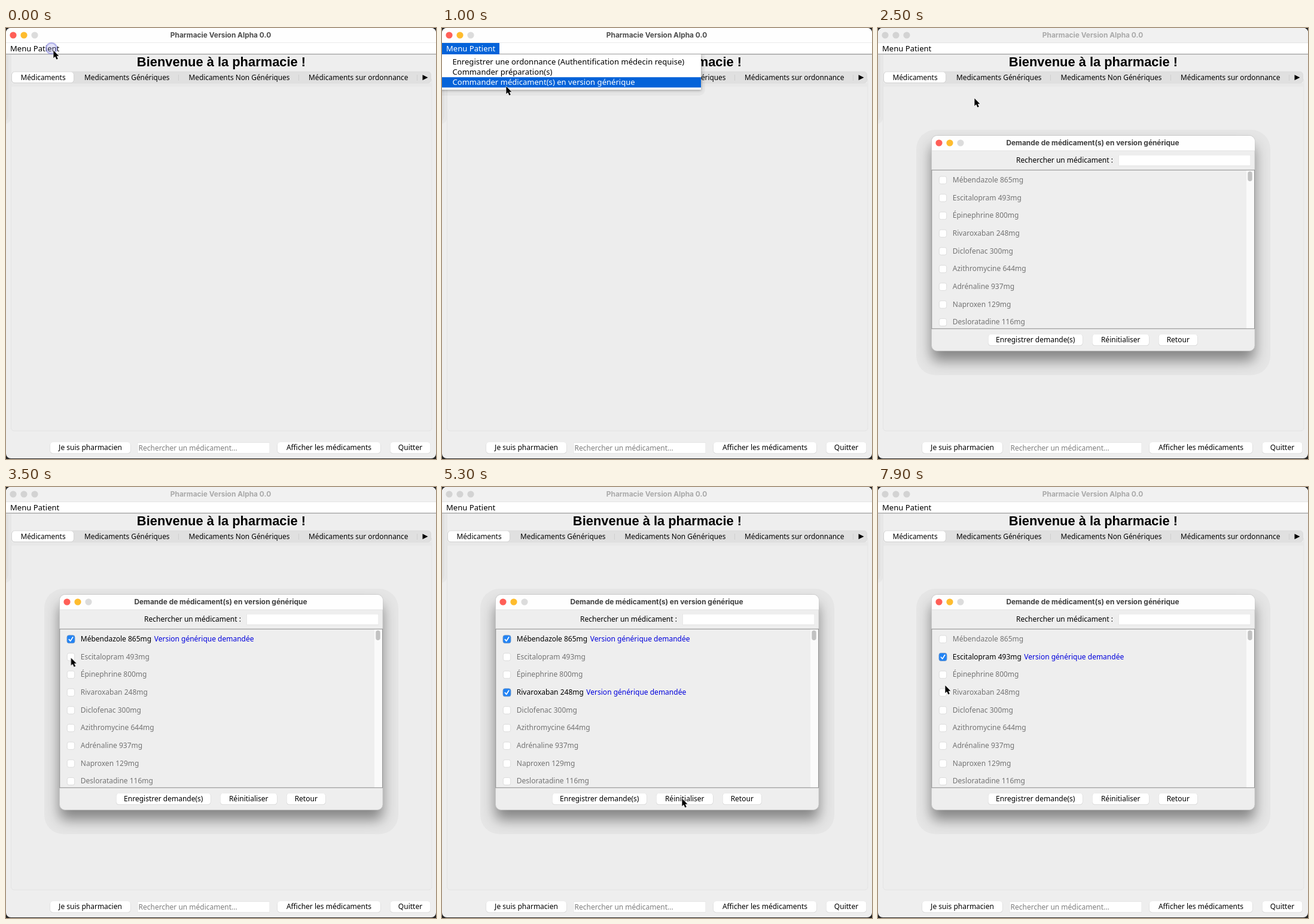
An HTML page for the animation above (8 s loop, 719 by 720 pixels).

```html
<!DOCTYPE html>
<html lang="fr">
<head>
<meta charset="utf-8">
<title>Pharmacie</title>
<style>
html, body { margin: 0; width: 100%; height: 100%; overflow: hidden; background: #222; }
svg { display: block; width: 100%; height: 100%; font: 12px "Noto Sans", "Open Sans", sans-serif; }
text { white-space: pre; }
.mid { text-anchor: middle; }
.tab { font-size: 11.85px; }
.menu { font-size: 13px; letter-spacing: .04px; }
.title { font: 700 11.9px Inter, sans-serif; text-anchor: middle; }
.heading { font: 700 21.9px "Liberation Sans", Arial, sans-serif; text-anchor: middle; }
.soft { filter: blur(11px); }
.tight { filter: blur(2px); }

.anim { animation: 8s step-end infinite; }
.open { animation-name: open; }
.item1 { animation-name: item1; }
.item2 { animation-name: item2; }
.item3 { animation-name: item3; }
.dialog { animation-name: dialog; }
.pick0 { animation-name: pick0; }
.pick1 { animation-name: pick1; }
.pick3 { animation-name: pick3; }
.focus { animation-name: focus; }
.ring { animation-name: ring; }
.cursor { animation-name: cursor; }

@keyframes open { 0% { opacity: 0 } 1.25% { opacity: 1 } 27.5%, 100% { opacity: 0 } }
@keyframes item1 { 0% { opacity: 0 } 3.75% { opacity: 1 } 5%, 100% { opacity: 0 } }
@keyframes item2 { 0% { opacity: 0 } 5% { opacity: 1 } 6.25%, 100% { opacity: 0 } }
@keyframes item3 { 0% { opacity: 0 } 6.25%, 100% { opacity: 1 } }
@keyframes dialog { 0% { opacity: 0 } 28.75%, 100% { opacity: 1 } }
@keyframes pick0 { 0% { opacity: 0 } 41.25% { opacity: 1 } 73.75%, 100% { opacity: 0 } }
@keyframes pick3 { 0% { opacity: 0 } 47.5% { opacity: 1 } 73.75%, 100% { opacity: 0 } }
@keyframes pick1 { 0% { opacity: 0 } 97.5%, 100% { opacity: 1 } }
@keyframes focus { 0% { opacity: 0 } 73.75% { opacity: 1 } 96.25%, 100% { opacity: 0 } }
@keyframes ring {
  0% { opacity: 1; transform: translate(76px, 34px) }
  2.5% { opacity: 0 }
  26.25% { opacity: 1; transform: translate(111px, 94px) }
  28.75% { opacity: 0 }
  40% { opacity: 1; transform: translate(109px, 253px) }
  42.5% { opacity: 0 }
  46.25% { opacity: 1; transform: translate(107px, 343px) }
  48.75% { opacity: 0 }
  72.5% { opacity: 1; transform: translate(401px, 521px) }
  75% { opacity: 0 }
  96.25% { opacity: 1; transform: translate(107px, 279px) }
  98.75%, 100% { opacity: 0; transform: translate(107px, 279px) }
}
/* The pointer advances every 100 ms: one step per 1.25 %. */
@keyframes cursor {
  0% { transform: translate(79px, 37px); animation-timing-function: steps(2) }
  2.5% { transform: translate(80px, 39px) }
  3.75% { transform: translate(84px, 52px) }
  5% { transform: translate(91px, 70px) }
  6.25% { transform: translate(97px, 86px) }
  7.5% { transform: translate(101px, 97px); animation-timing-function: steps(3) }
  11.25% { transform: translate(106px, 98px); animation-timing-function: steps(3) }
  15% { transform: translate(109px, 95px) }
  25% { transform: translate(111px, 94px) }
  27.5% { transform: translate(113px, 95px) }
  28.75% { transform: translate(127px, 101px); animation-timing-function: steps(2) }
  31.25% { transform: translate(161px, 117px); animation-timing-function: steps(2) }
  33.75% { transform: translate(168px, 124px) }
  36.25% { transform: translate(164px, 132px); animation-timing-function: steps(3) }
  40% { transform: translate(109px, 253px) }
  42.5% { transform: translate(109px, 256px); animation-timing-function: steps(3) }
  46.25% { transform: translate(107px, 343px) }
  48.75% { transform: translate(107px, 345px); animation-timing-function: steps(4) }
  53.75% { transform: translate(121px, 389px); animation-timing-function: steps(2) }
  56.25% { transform: translate(130px, 440px) }
  60% { transform: translate(165px, 456px); animation-timing-function: steps(3) }
  63.75% { transform: translate(352px, 520px); animation-timing-function: steps(2) }
  66.25% { transform: translate(401px, 520px) }
  78.75% { transform: translate(386px, 517px); animation-timing-function: steps(3) }
  82.5% { transform: translate(207px, 438px) }
  86.25% { transform: translate(201px, 430px); animation-timing-function: steps(5) }
  92.5% { transform: translate(112px, 296px); animation-timing-function: steps(2) }
  95% { transform: translate(107px, 279px) }
  97.5% { transform: translate(108px, 288px) }
  98.75%, 100% { transform: translate(112px, 331px) }
}
</style>
</head>
<body>
<svg id="stage" viewBox="0 0 719 720"></svg>
<script>
const box = (x, y, w, h, fill, extra = '') =>
  `<rect x="${x}" y="${y}" width="${w}" height="${h}" fill="${fill}" ${extra}/>`;
const text = (x, y, s, cls = '', fill = '#000') =>
  `<text x="${x}" y="${y}" class="${cls}" fill="${fill}">${s}</text>`;
const lights = (x, y, colors) => colors.map((c, i) =>
  `<circle cx="${x + 18 * i}" cy="${y}" r="5.6" fill="${c}"/>`).join('');
const anim = (name, body) => `<g class="anim ${name}">${body}</g>`;

const button = (x, y, w, label) =>
  box(x - .5, y, w + 1, 19.3, '#d4d4d4', 'rx="5"') +
  box(x, y, w, 18.4, '#fff', 'rx="4.5"') +
  text(x + w / 2, y + 13.3, label, 'mid');
const field = (x, y, w) =>
  box(x - .5, y - .5, w + 1, 18.5, '#e0e0e0') + box(x, y, w, 17.2, '#fff');

const active = ['#ff5f57', '#febc2e', '#dcdcdc'];
const idle = ['#d3d3d3', '#d3d3d3', '#d3d3d3'];
const barShape = (fill) => `<path d="M0 25V8A8 8 0 0 1 8 0H711A8 8 0 0 1 719 8V25Z" fill="${fill}"/>`;
const titleBar = (fill, ink, dots) =>
  barShape(fill) + box(0, 24.4, 719, .8, '#dedede') +
  lights(12, 12, dots) + text(359, 16, 'Pharmacie Version Alpha 0.0', 'title', ink);

const tabs = [[62, 'Médicaments'], [202.3, 'Medicaments Génériques'],
  [390, 'Medicaments Non Génériques'], [589.3, 'Médicaments sur ordonnance']];

const mainWindow =
  box(0, 0, 719, 719, '#eee', 'rx="8"') +
  titleBar('#fefefe', '#4b4b4b', active) +
  box(0, 25, 719, 18, '#fff') + box(0, 43, 719, 1.2, '#9a9a9a') +
  '<path d="M0 45H9V148Q8 158 0 160Z" fill="#e7e7e7"/><path d="M0 45H4V146Q3 153 0 155Z" fill="#e1e1e1"/>' +
  text(7, 39, 'Menu Patient', 'menu') +
  text(360, 64, 'Bienvenue à la pharmacie !', 'heading') +
  box(8.5, 83, 703.5, 590, '#ededed', 'rx="5" stroke="#e3e3e3"') +
  box(9, 92, 702.5, 6, '#e8e8e8') +
  box(9.5, 73, 701, 19, '#e0e0e0', 'rx="5" stroke="#d9d9d9" stroke-width=".8"') +
  box(9.5, 73.6, 104, 18.4, '#c9c9c9', 'rx="5"') +
  box(10, 73.6, 103, 17.6, '#fff', 'rx="4.5"') +
  [288, 489, 687].map(x => box(x, 78, 1, 10, '#cfcfcf')).join('') +
  tabs.map(([x, s]) => text(x, 87, s, 'mid tab')).join('') +
  '<path d="M696.5 78.3L705.5 82.8L696.5 87.3Z"/>' +
  button(74, 692, 134, 'Je suis pharmacien') +
  field(220.5, 693, 220) + text(221.5, 706, 'Rechercher un médicament...', '', '#7d7d7d') +
  button(454, 692, 172, 'Afficher les médicaments') +
  button(642.5, 692, 67, 'Quitter');

const blue = '#0563d9';
const items = ['Enregistrer une ordonnance (Authentification médecin requise)',
  'Commander préparation(s)', 'Commander médicament(s) en version générique'];
const menu =
  box(-12, 38, 452, 75, '#000', 'rx="10" opacity=".03"') +
  box(-6, 45, 440, 60, '#000', 'rx="3" opacity=".25" class="tight"') +
  box(0, 25, 719, 18, '#fff') + box(0, 43, 719, 1.2, '#9a9a9a') +
  box(0, 25, 96, 19, blue) + text(7, 39, 'Menu Patient', 'menu', '#fff') +
  box(0, 44, 433, 59, '#fff') +
  items.map((s, i) => {
    const y = 61 + 17.1 * i;
    return text(17.5, y, s, 'menu') +
      anim('item' + (i + 1), box(0, y - 13, 433, 17.2, blue) + text(17.5, y, s, 'menu', '#fff'));
  }).join('');

const drugs = ['Mébendazole 865mg', 'Escitalopram 493mg', 'Épinephrine 800mg',
  'Rivaroxaban 248mg', 'Diclofenac 300mg', 'Azithromycine 644mg',
  'Adrénaline 937mg', 'Naproxen 129mg', 'Desloratadine 116mg'];
const picked = [0, 1, 3];
const drugRow = (s, i) => {
  const y = 254 + 29.68 * i;
  const plain = box(102.3, y - 6, 12.4, 12.4, '#fff', 'rx="3" stroke="#d6d6d6" stroke-width=".8"') +
    text(124.8, y + 4, s, '', '#747474');
  if (!picked.includes(i)) return plain;
  return plain + anim('pick' + i,
    box(100, y - 10, 320, 20, '#eee') +
    box(102, y - 6.2, 13, 13, '#2183f5', 'rx="3.2" stroke="#6d95c6" stroke-width=".9"') +
    `<path d="M105.4 ${y + .6}l2.3 2.8l4-6.4" fill="none" stroke="#fff" stroke-width="1.7" stroke-linecap="round" stroke-linejoin="round"/>` +
    text(124.8, y + 4, `${s}<tspan dx="4.5" fill="#0000dc">Version générique demandée</tspan>`));
};

const dialog =
  titleBar('#f1f1f1', '#a9a9a9', idle) +
  box(64, 170, 592, 410, '#000', 'rx="32" opacity=".03"') +
  box(89, 196, 541, 360, '#000', 'rx="10" opacity=".42" class="soft"') +
  box(89.5, 179.5, 540.5, 360, '#eee', 'rx="9" stroke="#c4c4c4" stroke-width=".8"') +
  '<path d="M90 205V189A9 9 0 0 1 99 180H621A9 9 0 0 1 630 189V205Z" fill="#fefefe"/>' +
  box(90, 204.6, 540, .8, '#dedede') +
  lights(102, 192, active) +
  text(359, 195.6, 'Demande de médicament(s) en version générique', 'title', '#3f3f3f') +
  text(231, 225, 'Rechercher un médicament :') + field(403, 212.5, 219.5) +
  drugs.map(drugRow).join('') +
  box(616, 238, 13.5, 264, '#fafafa') + box(618.3, 239.5, 7.4, 16.5, '#c2c2c2', 'rx="3.7"') +
  box(89.8, 237.3, 539.8, 265, 'none', 'stroke="#8c8c8c" stroke-width="1"') +
  button(184.5, 511.8, 157.5, 'Enregistrer demande(s)') +
  button(358.5, 511.8, 94.5, 'Réinitialiser') +
  anim('focus', box(358.3, 511.6, 94.8, 18.8, 'none', 'rx="4.5" stroke="#828b9c" stroke-width="1.5"')) +
  button(469.5, 511.8, 64.5, 'Retour');

const pointer =
  anim('ring', '<circle r="9" fill="#9a9ae8" fill-opacity=".28" stroke="#8c8ce0" stroke-opacity=".6" stroke-width="2.6"/>') +
  anim('cursor', '<path d="M.4 .4V13.2L3.2 10.5L5.4 15.6L7.8 14.6L5.6 9.7H9.4Z" stroke="#fff" stroke-opacity=".75" stroke-width="1.2" paint-order="stroke"/>');

document.getElementById('stage').innerHTML =
  mainWindow + anim('open', menu) + anim('dialog', dialog) + pointer;
</script>
</body>
</html>
```
